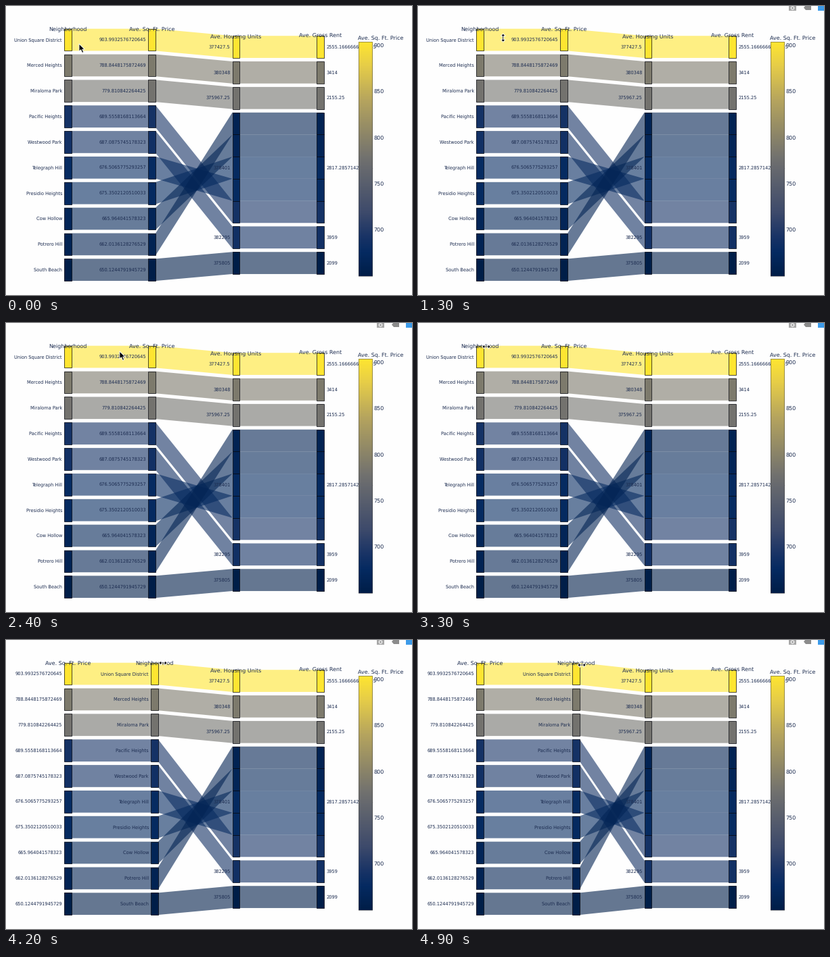
A matplotlib script that plays this animation: 600x428 px, repeating every 5000 ms.

```python
import numpy as np
import matplotlib.pyplot as plt
from matplotlib.animation import FuncAnimation
from matplotlib.colors import LinearSegmentedColormap
from matplotlib.patches import Polygon, Rectangle

W, H = 600, 428
FRAMES, STEP = 50, 100
INK = "#1c2c50"
BAND, GAP, BAR = 32.7, 5.15, 10.8
COLUMNS = [86.0, 210.3, 334.5, 458.8]
LOW, HIGH = 650.12, 903.99

plt.rcParams.update({"font.family": "DejaVu Sans", "text.hinting": "none"})
SCALE = LinearSegmentedColormap.from_list("scale", [
    (0, "#001e48"), (0.1, "#052a61"), (0.17, "#1a3466"), (0.27, "#3d4a6b"),
    (0.5, "#70706f"), (0.75, "#b5a45e"), (0.9, "#e6cd48"), (1, "#fee531")], N=512)

AREAS = ["Union Square District", "Merced Heights", "Miraloma Park", "Pacific Heights",
         "Westwood Park", "Telegraph Hill", "Presidio Heights", "Cow Hollow",
         "Potrero Hill", "South Beach"]
PRICES = ["903.9932576720645", "788.8448175872469", "779.810842264425",
          "689.5558168113664", "687.0875745178323", "676.5065775293257",
          "675.3502120510033", "665.964041578323", "662.0136128276529",
          "650.1244791945729"]
UNITS = ["377427.5", "380348", "375967.25", "378401", "382295", "375805"]
RENTS = ["2555.1666666666665", "3414", "2155.25", "2817.285714285714", "3959", "2099"]
SLOT = [0, 1, 2, 7, 8, 6, 5, 4, 3, 9]        # place of each area in the grouped columns
GROUP = [0, 1, 2, 3, 3, 3, 3, 3, 4, 5]       # category of each place
GROUP_SIZE = [1, 1, 1, 5, 1, 1]

single_y = 33.7 + (BAND + GAP) * np.arange(10)
grouped_y = 44.2 + BAND * np.arange(10) + GAP * np.array(GROUP)
row_colors = [SCALE((float(p) - LOW) / (HIGH - LOW)) for p in PRICES]

fig = plt.figure(figsize=(W / 72, H / 72), dpi=72, facecolor="#fefefe")
ax = fig.add_axes([0, 0, 1, 1])
ax.set(xlim=(0, W), ylim=(H, 0))
ax.axis("off")


def write(x, y, text, size=6.65, ha="left", z=4, **style):
    style.setdefault("color", INK)
    return ax.text(x, y + 0.36 * size, text, fontsize=size, ha=ha, va="baseline",
                   zorder=z, **style)


def shape(points, z, **style):
    patch = Polygon(points, closed=True, zorder=z, **style)
    return ax.add_patch(patch)


class Column:
    """Bars, category labels and title that move together."""

    def __init__(self, x, tops, title, names, sizes, last=False):
        self.tops, self.last = tops, last
        self.bars = [ax.add_patch(Rectangle((x, top), BAR, BAND, fc=color, ec="#06080f",
                                            lw=0.7, zorder=3))
                     for top, color in zip(tops, row_colors)]
        self.labels = []
        ordered, first = np.sort(tops), 0
        for name, size in zip(names, sizes):
            middle = ordered[first] + BAND * size / 2 - 0.3
            self.labels.append(write(x, middle, name, ha="left" if last else "right"))
            first += size
        self.title = write(x, ordered[0] + 0.2, title, 8.05, "center", 5)
        self.move(x)

    def move(self, x):
        self.x = x
        for bar in self.bars:
            bar.set_x(x)
        for label in self.labels:
            label.set_x(x + BAR + 3.5 if self.last else x - 3)
        self.title.set_x(x + BAR / 2)


slots_y = grouped_y[SLOT]
area = Column(COLUMNS[0], single_y, "Neighborhood", AREAS, [1] * 10)
price = Column(COLUMNS[1], single_y, "Ave. Sq. Ft. Price", PRICES, [1] * 10)
units = Column(COLUMNS[2], slots_y, "Ave. Housing Units", UNITS, GROUP_SIZE)
rent = Column(COLUMNS[3], slots_y, "Ave. Gross Rent", RENTS, GROUP_SIZE, last=True)


def link_outline(row, order):
    top = []
    for column in order:
        top += [(column.x, column.tops[row]), (column.x + BAR, column.tops[row])]
    return top + [(x, y + BAND) for x, y in reversed(top)]


links = [shape([(0, 0), (1, 0), (1, 1)], 2, fc=color, ec="none", alpha=0.6)
         for color in row_colors]

# Colour bar
ax.imshow(np.linspace(1, 0, 347)[:, None], cmap=SCALE, extent=(520.8, 541, 400.2, 53.4),
          aspect="auto", zorder=6)
ax.add_patch(Rectangle((520.8, 53.4), 20.2, 346.8, fill=False, ec="#444444", lw=0.5, zorder=6))
write(520.5, 46, "Ave. Sq. Ft. Price", 8.05, z=7)
for value in range(700, 901, 50):
    write(543, 59.2 + (900 - value) * 1.366, str(value), 7.95, z=7)

# Toolbar
toolbar = [
    shape([(548, 0), (559, 0), (559, 7), (548, 7)], 5, fc="#a8a8a8", ec="none"),
    ax.add_patch(plt.Circle((553.5, 3), 2.2, fc="#a8a8a8", ec="white", lw=1, zorder=6)),
    shape([(570, 2.5), (573, -1), (581, -1), (581, 6), (573, 6)], 5, fc="#8c8c8c", ec="none"),
    shape([(591, -2), (600, -2), (600, 7), (591, 7)], 5, fc="#3d9be9", ec="none"),
]

# Hover box
tip = [
    shape([(97, 50), (99.6, 47.5), (99.6, 43.3), (144, 43.3), (144, 56.8), (99.6, 56.8),
           (99.6, 52.5)], 8, fc="#c9cbc9", ec="#33343a", lw=0.9),
    write(102.3, 49.8, "Count: 1", 8.1, z=9, family="DejaVu Sans Mono", color="#25262c"),
]

# Mouse pointers
ARROW = np.array([(0, 0), (0, 11.2), (2.6, 8.8), (4.6, 13.4), (6.7, 12.5), (4.8, 8.1), (8.2, 8.1)])
SIDEWAYS = np.array([(-6.2, 0), (-2.6, -3.4), (-2.6, -0.9), (2.6, -0.9), (2.6, -3.4),
                     (6.2, 0), (2.6, 3.4), (2.6, 0.9), (-2.6, 0.9), (-2.6, 3.4)])
UPRIGHT = SIDEWAYS[:, ::-1]
pointer = shape(ARROW, 10, fc="black", ec="white", lw=0.9, joinstyle="round")

PATH = np.array([
    (0, 108, 56), (400, 108, 56), (700, 89, 49), (1000, 89, 49), (1800, 187, 44),
    (2200, 187, 44), (3100, 101, 35), (3500, 101, 35), (4000, 194, 28),
    (4200, 232, 34), (4400, 249, 37), (4900, 242, 37)])
DRAG = np.array([(3500, 0), (3700, 18), (4000, 64.5), (4200, 128), (4300, 142),
                 (4400, 146.3), (4600, 146.3), (4900, 142.3)])


def pointer_shape(t):
    if 700 <= t <= 2200:
        return UPRIGHT
    if 3100 <= t < 3800 or t >= 4200:
        return SIDEWAYS
    return ARROW


def update(frame):
    t = frame * STEP
    shift = np.interp(t, DRAG[:, 0], DRAG[:, 1])
    swapped = COLUMNS[0] + shift > COLUMNS[1]
    area.move(COLUMNS[0] + shift)
    price.move(COLUMNS[0] if swapped else COLUMNS[1])
    order = [price, area, units, rent] if swapped else [area, price, units, rent]
    for row, link in enumerate(links):
        link.set_xy(link_outline(row, order))

    hover = 700 <= t <= 1100
    links[0].set_alpha(1 if hover else 0.6)
    links[0].set_edgecolor("#5c5a3c" if hover else "none")
    links[0].set_linewidth(0.6 if hover else 0)
    area.bars[0].set_linewidth(1.8 if hover else 0.7)
    for part in tip:
        part.set_visible(hover)
    for icon in toolbar:
        icon.set_alpha(np.interp(t, [600, 1000], [0, 1]))

    where = [np.interp(t, PATH[:, 0], PATH[:, i]) for i in (1, 2)]
    pointer.set_xy(pointer_shape(t) + where)
    return []


anim = FuncAnimation(fig, update, frames=FRAMES, interval=STEP, repeat=True, repeat_delay=0,
                     init_func=lambda: update(0), blit=False)
plt.show()
```
